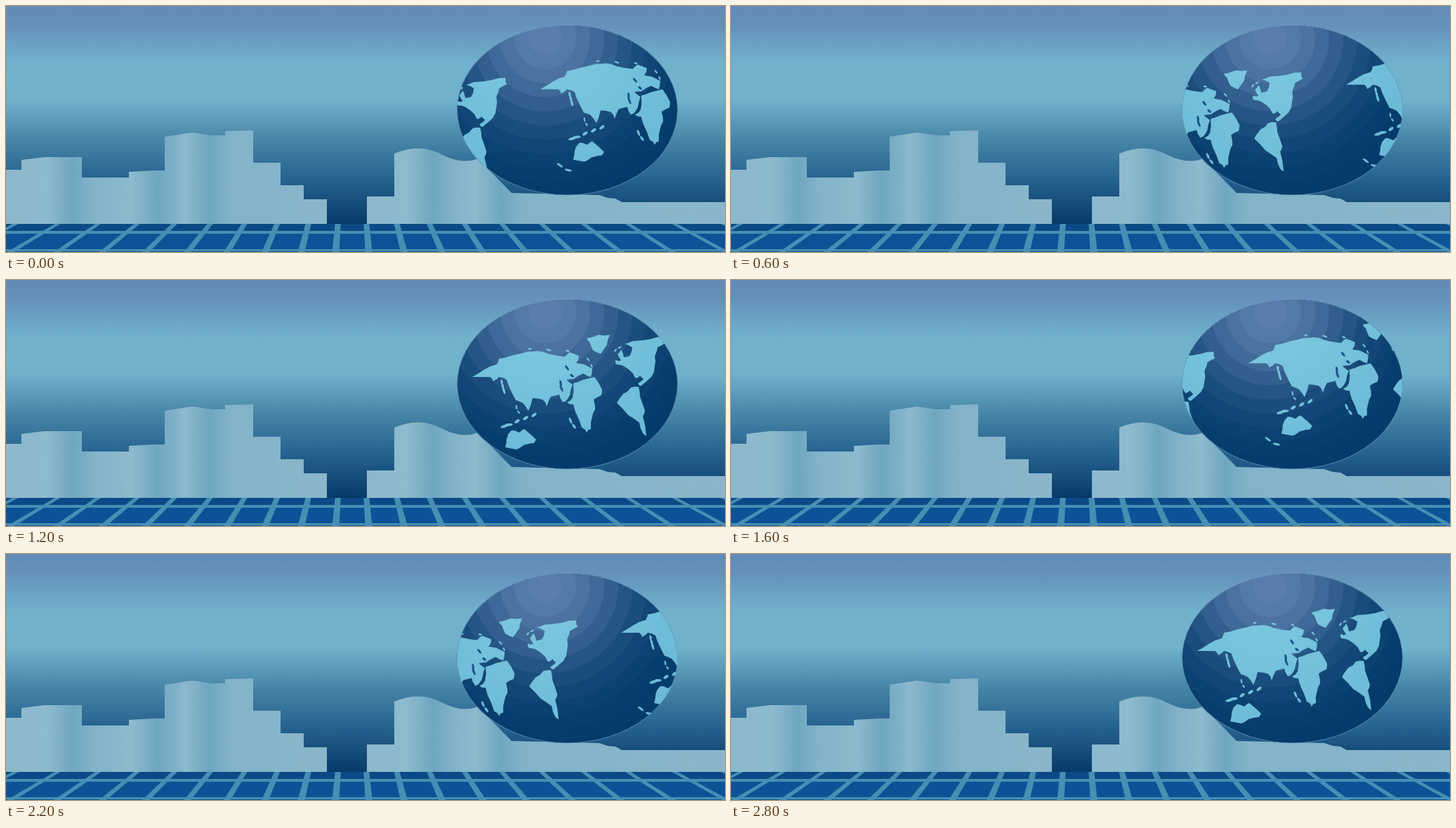
An HTML page with a canvas that plays this animation: 1024 by 350 pixels, repeating every 3000 ms.

```html
<!DOCTYPE html>
<html lang="en">
<head>
<meta charset="utf-8">
<title>Turning globe</title>
<style>
html, body { margin: 0; width: 100%; height: 100%; overflow: hidden; background: #2f6595; }
canvas { display: block; }
</style>
</head>
<body>
<canvas id="stage" width="1024" height="350"></canvas>
<script>
const ctx = document.getElementById('stage').getContext('2d');
const STEP = 200, LOOP = 3000, MAP_PERIOD = 8;
const LIGHT = { x: 768, y: 46 };

let seed = 7;
const random = () => (seed = seed * 16807 % 2147483647) / 2147483647;
const jitter = size => (random() - 0.5) * size;

// Closed outline through a few key points, with a slightly ragged edge between them.
function coast(outline) {
  const points = outline.split(' ').map(pair => pair.split(',').map(Number));
  const path = new Path2D();
  points.forEach(([x, y], i) => {
    const [nextX, nextY] = points[(i + 1) % points.length];
    path.lineTo(x, y);
    path.lineTo((x + nextX) / 2 + jitter(2.5), (y + nextY) / 2 + jitter(2.5));
  });
  path.closePath();
  return path;
}

// Row of small tilted islands running from one point to another.
function islands(x1, y1, x2, y2, count, size) {
  const path = new Path2D();
  for (let i = 0; i < count; i++) {
    const p = i / Math.max(1, count - 1);
    const x = x1 + (x2 - x1) * p, y = y1 + (y2 - y1) * p;
    const length = size * (0.8 + random() * 0.5);
    const tilt = Math.atan2(y2 - y1, x2 - x1) + jitter(0.6);
    path.moveTo(x + length * Math.cos(tilt), y + length * Math.sin(tilt));
    path.ellipse(x, y, length, size * 0.4, tilt, 0, 2 * Math.PI);
  }
  return path;
}

const eurasia = coast('664,138 682,127 699,120 702,112 722,107 743,102 757,101 772,105 796,109 803,103 816,108 812,118 823,120 835,126 833,138 822,133 808,141 798,142 807,149 804,158 800,169 793,174 788,163 776,166 770,180 764,170 750,168 744,186 736,175 726,171 718,155 713,142 702,138 694,144 690,138');
const africa = coast('808,147 822,142 838,138 849,156 848,164 837,170 839,184 835,194 833,212 827,217 820,210 811,188 808,177 799,174 807,167');
const australia = coast('711,238 713,226 720,214 731,217 738,212 755,227 752,232 737,235 727,241');
const greenland = coast('827,83 844,78 860,78 856,92 847,105 836,100 831,88');
const northAmerica = coast('881,91 892,87 918,84 937,81 939,90 928,96 924,108 924,122 919,138 904,151 900,147 908,141 903,136 897,140 893,133 879,122 869,120 868,114 876,114 871,106 876,99 880,110 888,108 892,96');
const southAmerica = coast('890,153 901,152 903,166 910,186 907,194 912,222 907,218 902,203 886,192 870,175 879,162');
const land = new Path2D();
[
  eurasia, africa, australia, greenland, northAmerica, southAmerica,
  islands(692, 246, 704, 253, 2, 4),    // New Zealand
  islands(710, 208, 716, 206, 2, 5),    // New Guinea
  islands(728, 201, 752, 192, 3, 5),    // Indonesia
  islands(727, 181, 730, 188, 2, 3),    // Philippines
  islands(706, 145, 709, 157, 3, 4),    // Japan
  islands(804, 200, 809, 208, 2, 4),    // Madagascar
  islands(746, 98, 800, 101, 3, 3),     // Arctic
  islands(829, 113, 834, 122, 2, 3),    // British Isles
  islands(868, 100, 874, 96, 2, 3)      // Canadian north
].forEach(part => land.addPath(part));
const seas = new Path2D();
seas.addPath(islands(790, 147, 791, 154, 2, 4));
seas.addPath(islands(799, 125, 806, 136, 2, 4));

function blend(gradient, colors) {
  for (const [at, color] of Object.entries(colors)) gradient.addColorStop(Number(at), color);
  return gradient;
}
const sky = blend(ctx.createLinearGradient(0, 0, 0, 310), {
  0: '#628bb6', 0.08: '#6490b9', 0.26: '#71b1cc', 0.43: '#70b2cc', 0.61: '#4886a7', 0.8: '#25618e', 1: '#073a69'
});
const landFill = blend(ctx.createRadialGradient(LIGHT.x, LIGHT.y, 0, LIGHT.x, LIGHT.y, 220), {
  0: '#7fc9e0', 0.4: '#76c4dd', 1: '#6bbad6'
});

// Pale wall with soft darker folds at the given positions.
function wall(from, to, folds) {
  const gradient = ctx.createLinearGradient(from, 0, to, 0);
  const stop = (x, color) => gradient.addColorStop((x - from) / (to - from), color);
  stop(from, '#8cb8cc');
  for (const x of folds) {
    stop(x - 36, '#8cbace');
    stop(x, '#70a6c0');
    stop(x + 30, '#82b3c9');
  }
  stop(to, '#8ab6cb');
  return gradient;
}
const town = [
  {
    shape: new Path2D('M0 310V233H22V219L55 215H108V244H175V236L210 234H226V186L265 180 293 184H312V178L352 177V223H391V255H424V275H457V310Z'),
    fill: wall(0, 457, [95, 215, 290])
  },
  {
    shape: new Path2D('M514 310V271H553V210Q590 194 622 212Q650 226 672 217L720 266 845 269 857 273 868 274 877 279H1024V310Z'),
    fill: wall(514, 1024, [608, 705])
  }
];

function drawTown() {
  for (const { shape, fill } of town) {
    ctx.fillStyle = fill;
    ctx.fill(shape);
  }
}

function drawFloor() {
  ctx.fillStyle = '#0b4a86';
  ctx.fillRect(0, 310, 1024, 12);
  ctx.fillStyle = '#0b5396';
  ctx.fillRect(0, 322, 1024, 28);
  ctx.fillStyle = '#468fb3';
  const middle = 493;
  for (let k = -10.5; k < 11; k++) {
    const top = 40 * k + (k < 0 ? -1.1 : 1.65) * k * k;
    const bottom = top * 1.16;
    ctx.beginPath();
    ctx.moveTo(middle + top - 4, 310);
    ctx.lineTo(middle + top + 4, 310);
    ctx.lineTo(middle + bottom + 5, 350);
    ctx.lineTo(middle + bottom - 5, 350);
    ctx.fill();
  }
  ctx.fillRect(0, 320, 1024, 4);
  ctx.fillRect(0, 346, 1024, 3);
}

function shade(distance) {
  const glow = Math.exp(-((distance / 115) ** 2));
  const mix = (dark, light) => Math.round(dark + (light - dark) * glow);
  return `rgb(${mix(2, 90)}, ${mix(58, 126)}, ${mix(106, 172)})`;
}

// Map position a number of steps before or after it faces the viewer.
function mapOffset(u, headStart) {
  const x = u < 0 ? 41.6 * u : u * (32.4 + 2 * u);
  const y = u < 0 ? 6.6 * (-u) ** 0.65 : -26 * (1 - Math.exp(-((u / 1.7) ** 2)));
  return [x + headStart, y];
}

function drawGlobe(step) {
  const outline = new Path2D();
  outline.ellipse(799.5, 148, 157, 121, 0, 0, 2 * Math.PI);
  ctx.save();
  ctx.clip(outline);
  for (let r = 264; r > 0; r -= 20) {
    ctx.fillStyle = shade(r - 14);
    ctx.beginPath();
    ctx.arc(LIGHT.x, LIGHT.y, r, 0, 2 * Math.PI);
    ctx.fill();
  }
  const headStart = 24 * Math.max(0, 1 - step / 3);
  for (let front = -2; front <= 14; front += MAP_PERIOD) {
    const shift = new DOMMatrix().translate(...mapOffset(step - front, headStart));
    for (const [shape, color] of [[land, landFill], [seas, '#1b5389']]) {
      const moved = new Path2D();
      moved.addPath(shape, shift);
      ctx.fillStyle = color;
      ctx.fill(moved);
    }
  }
  ctx.restore();
  ctx.strokeStyle = 'rgba(135, 180, 210, 0.6)';
  ctx.stroke(outline);
}

function draw(time) {
  ctx.fillStyle = sky;
  ctx.fillRect(0, 0, 1024, 350);
  drawTown();
  drawFloor();
  drawGlobe(Math.floor(time % LOOP / STEP));
}

const start = performance.now();
function tick() {
  draw(performance.now() - start);
  requestAnimationFrame(tick);
}
tick();
</script>
</body>
</html>
```
